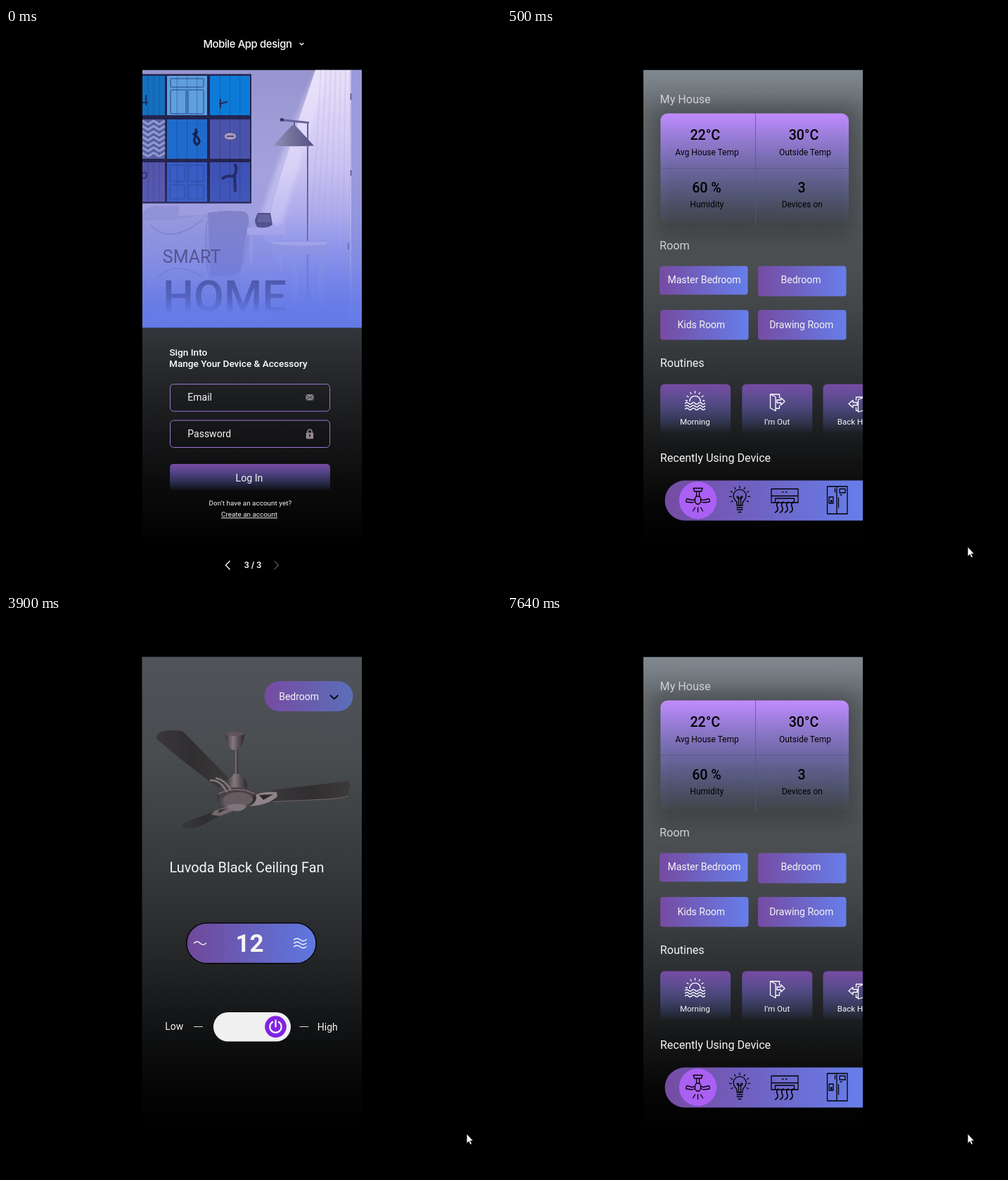
Recreate the animation shown at these times as an HTML page. Size 704 px wide and 795 px high, loop 8000 ms.

```html
<!DOCTYPE html>
<html lang="en">
<head>
<meta charset="utf-8">
<title>Smart home app</title>
<style>
html, body { margin: 0; width: 100%; height: 100%; overflow: hidden; background: #000; }
svg { display: block; width: 704px; height: 795px; }
text { font-family: Roboto, sans-serif; white-space: pre; }
.inter { font-family: Inter, sans-serif; }
</style>
</head>
<body>
<svg id="stage" viewBox="0 0 704 795" xmlns="http://www.w3.org/2000/svg"></svg>
<script>
const LOOP = 8000;
const CUES = [[0, 'login'], [500, 'home'], [3900, 'fan'], [7640, 'home']];

// --- drawing helpers ---
const box = (x, y, w, h, fill, r = 0, extra = '') =>
  `<rect x="${x}" y="${y}" width="${w}" height="${h}" rx="${r}" fill="${fill}" ${extra}/>`;
const shape = (d, fill, extra = '') => `<path d="${d}" fill="${fill}" ${extra}/>`;
const line = (d, color, width = 1, extra = '') =>
  `<path d="${d}" fill="none" stroke="${color}" stroke-width="${width}" ${extra}/>`;
const text = (x, y, str, size, fill = '#f4f4f4', extra = '') =>
  `<text x="${x}" y="${y}" font-size="${size}" fill="${fill}" ${extra}>${str}</text>`;
const label = (x, y, str, size, fill, extra = '') =>
  text(x, y, str, size, fill, `text-anchor="middle" ${extra}`);
const round = 'stroke-linecap="round" stroke-linejoin="round"';
const wave = (x, y, w, h) =>
  `M${x} ${y}q${w / 4} ${-h} ${w / 2} 0t${w / 2} 0`;

// stops: [offset, color, opacity]
function gradient(id, dir, stops, units = '') {
  const end = dir === 'v' ? 'x2="0" y2="1"' : 'x2="1" y2="0"';
  const list = stops.map(([o, c, a = 1]) =>
    `<stop offset="${o}" stop-color="${c}" stop-opacity="${a}"/>`).join('');
  return `<linearGradient id="${id}" ${units || end}>${list}</linearGradient>`;
}

const defs = `<defs>
  ${gradient('button', 'h', [[0, '#764ba2'], [1, '#667eea']])}
  ${gradient('picker', 'h', [[0, '#764ba2'], [1, '#5b6fba']])}
  ${gradient('speed', 'h', [[0, '#704899'], [1, '#5e78e0']])}
  ${gradient('fade', 'v', [[0, '#764ba2'], [1, '#667eea', 0]])}
  ${gradient('card', 'v', [[0, '#c18cff'], [1, '#667eea', 0]])}
  ${gradient('loginBg', 'v', [[0, '#323539'], [.4, '#1b1c1e'], [.7, '#0c0c0d'], [1, '#000']])}
  ${gradient('homeBg', 'v', [[0, '#818990'], [.08, '#686e73'], [.35, '#505457'], [.5, '#434649'],
    [.64, '#2f3235'], [.8, '#151617'], [.92, '#050505'], [1, '#000']])}
  ${gradient('fanBg', 'v', [[0, '#50545a'], [.2, '#494d50'], [.42, '#383b3e'], [.62, '#252729'],
    [.8, '#0f1011'], [.93, '#030303'], [1, '#000']])}
  ${gradient('wall', 'v', [[0, '#9795cf'], [.3, '#a19fd9'], [.6, '#a9a5e2'], [1, '#7d88e3']])}
  ${gradient('curtain', 'v', [[0, '#e9e0f8'], [.25, '#d5cdf4'], [.55, '#b9b2ec'], [1, '#7f8be6']])}
  ${gradient('haze', 'v', [[0, '#6a7ce8', 0], [.3, '#6a7ce8', .15], [.6, '#687be8', .52],
    [.85, '#647ae7', .9], [1, '#6279e7']])}
  ${gradient('shade', 'h', [[0, '#9391bb'], [.4, '#77759d'], [1, '#525085']])}
  ${gradient('homeWord', 'v', [[0, '#4f58ab'], [.6, '#5766c4'], [1, '#637ae6']],
    'gradientUnits="userSpaceOnUse" x1="0" y1="357" x2="0" y2="405"')}
  ${gradient('metal', 'h', [[0, '#3b3538'], [.4, '#85797f'], [.65, '#5d5257'], [1, '#2f292c']])}
  ${gradient('blade', 'h', [[0, '#39373a'], [.5, '#302e30'], [1, '#3c393a']])}
  <filter id="soft" x="-40%" y="-50%" width="180%" height="200%"><feGaussianBlur stdDeviation="16"/></filter>
  <filter id="blur3"><feGaussianBlur stdDeviation="3"/></filter>
  <clipPath id="phone">${box(194, 59.5, 312, 680, '#fff')}</clipPath>
  <clipPath id="photo">${box(194, 59.5, 312, 367, '#fff')}</clipPath>
</defs>`;

// --- login ---
function doors() {
  const cols = [[194, 32], [229, 57], [290, 57]];
  const rows = [68, 130, 191];
  const colors = ['#1470bf', '#5f9fdc', '#0c7bd8', '#5a64a6', '#1f6bcd', '#4a53ab', '#5555ab', '#385cc4', '#3d52b4'];
  let out = box(190, 65.5, 159, 184, '#24244f');
  rows.forEach((y, r) => cols.forEach(([x, w], c) => {
    out += box(x, y, w, 56, colors[r * 3 + c]);
    for (let i = 1; i < 4; i++)
      out += line(`M${x + w * i / 4} ${y}v56`, '#18376f', 1, 'opacity=".4"');
  }));
  for (let i = 0; i < 7; i++)
    out += line(`M194 ${132 + i * 7.6}l8 5l8 -5l8 5l8 -5`, '#a5afe0', 3, 'opacity=".75"');
  for (const [x, y, w, h] of [[234, 72, 47, 12], [234, 88, 22, 34], [259, 88, 22, 34],
                              [233, 195, 21, 23], [260, 195, 21, 23], [233, 223, 21, 20], [260, 223, 21, 20]])
    out += box(x, y, w, h, 'none', 1, 'stroke="#264f9c" stroke-opacity=".75" stroke-width="1.5"');
  out += line('M303 108l12 -3M305 101v13M194 106h8M199 95v15', '#242a59', 2)
    + '<ellipse cx="319" cy="154" rx="9" ry="5.5" fill="#a69bc2" stroke="#383b78"/>'
    + line('M314 154h10', '#4f4b85', 2)
    + line('M270 143v10q-5 8 1 13q7 -3 2 -10l-6 -5l6 -4', '#15204e', 3)
    + line('M325 193q5 8 0 16l1 24M307 215q6 -6 17 -4', '#252a67', 4)
    + line('M194 206q7 -2 6 4q-1 5 -6 3', '#34346e', 2);
  return out;
}

function room() {
  let out = box(194, 59.5, 312, 367, 'url(#wall)')
    + shape('M440 59.5H490V426H340Q368 285 395 196Q418 125 440 59.5z', 'url(#curtain)')
    + shape('M442 59.5Q395 160 358 280L392 282Q424 175 458 59.5z', '#eee8ff', 'opacity=".4" filter="url(#blur3)"');
  for (let i = 0; i < 6; i++)
    out += line(`M${448 + i * 7} 60Q${440 + i * 8} 210 ${425 + i * 11} 400`, '#a39bdc', 2, 'opacity=".2"');
  out += box(489.5, 59.5, 17, 367, '#9a9adc') + box(489.5, 59.5, 1.5, 367, '#c9c2ee')
    + line('M490.5 93v9M490.5 202v8M487 306v9', '#555590', 1.5);
  out += doors();
  // sofa and cushions
  out += shape('M194 264Q201 251 220 253H238Q246 251 248 258Q255 252 275 253H300Q308 255 307 262H333Q346 262 347 282V296Q368 298 382 312V426H194z', '#9796d6')
    + shape('M245 267Q245 253 257 253H297Q307 253 307 265z', '#a5a2df')
    + shape('M287 263Q310 258 338 261Q346 263 345 274L333 347Q318 356 291 353z', '#8583c4')
    + shape('M333 348Q343 325 347 296Q370 299 382 312V400H333z', '#a09fdf')
    + shape('M196 274Q230 276 277 266Q292 270 286 286Q280 326 292 360Q240 363 201 370Q188 350 196 274z', '#a09edb')
    + line('M286 274Q279 324 291 358M205 280q28 30 75 -8M214 357q24 -28 65 -4', '#7371b8', 1.5, 'opacity=".6"');
  // side tables
  out += shape('M343 284L397 282V294H343z', '#bbb3eb')
    + line('M349 294v42M391 294v52', '#aca7e3', 5)
    + shape('M358 263H376L379 280Q370 286 357 283Q354 278 354 273z', '#4b4876')
    + shape('M359 265H375L377 276H357z', '#625e91')
    + shape('M378 305Q381 302 390 302H452Q456 302 456 306V319Q455 322 449 322H381Q377 322 377 318z', '#a7a3e0')
    + shape('M378 304H456V308Q418 312 378 307z', '#bfb8ec')
    + line('M411 322v76M448 322v76', '#a6a4e3', 6);
  // lamp
  out += line('M390 130.5L429.5 134.5V303', '#66639a', 3)
    + line('M430.5 136V303', '#c8c0ea', 1)
    + line('M390 130.5h5', '#35335e', 4)
    + line('M410 132v8', '#605e91', 2)
    + shape('M407 138H411L438 167.5Q409 169 380 167.5z', 'url(#shade)');
  return out + line('M429 322V385', '#6f7dcf', 2.5)
    + box(194, 200, 312, 227, 'url(#haze)');
}

function login() {
  const field = (y, name) => box(233.5, y + .5, 227, 38.5, '#000', 5, 'fill-opacity=".12" stroke="#9b78d6"')
    + text(258.3, y + 24.2, name, 14);
  return label(343.5, 28.2, 'Mobile App design', 14.8, '#fff', 'class="inter" font-weight="500" letter-spacing="-.35"')
    + line('M417.8 21.2l2.8 2.8l2.8 -2.8', '#fff', 1.3)
    + `<g clip-path="url(#photo)">${room()}</g>`
    + text(222.8, 334, 'SMART', 25, '#565493')
    + text(223, 403, 'HOME', 62, 'url(#homeWord)', 'font-weight="500"')
    + box(194, 426.5, 312, 312, 'url(#loginBg)')
    + text(232.4, 466, 'Sign Into', 13.6, '#fff', 'font-weight="500"')
    + text(232, 482, 'Mange Your Device &amp; Accessory', 13.6, '#fff', 'font-weight="500"')
    + field(506, 'Email') + field(557.5, 'Password')
    + box(426.5, 521, 11, 8.5, '#8b8089', 1.5)
    + line('M427 522l5 4l5 -4M427 529l3.5 -3.5M437 529l-3.5 -3.5', '#252428', .9)
    + box(426.8, 575.5, 10.4, 8.8, '#918790', 1)
    + line('M429 576v-2q0 -3 3 -3t3 3v2', '#918790', 1.6)
    + '<circle cx="432" cy="579" r="1.2" fill="#1c1b1d"/>' + line('M432 579v3', '#1c1b1d', 1)
    + box(233, 620, 228, 38.5, 'url(#fade)', 5)
    + label(346, 644.5, 'Log In', 14.2)
    + label(347.3, 678.5, 'Don’t have an account yet?', 9.95)
    + label(346, 695.3, 'Create an account', 9.9, '#f4f4f4', 'text-decoration="underline"')
    + line('M318.5 757.8l-6 6.2l6 6.2', '#fff', 1.3)
    + label(351, 767.5, '3 / 3', 11.6, '#fff', 'class="inter" font-weight="600"')
    + line('M381.5 757.8l6 6.2l-6 6.2', '#5c5c5c', 1.2);
}

// --- home ---
// short strokes radiating from a center, spread evenly over an arc
function rays(cx, cy, inner, outer, from, to, count) {
  let d = '';
  for (let i = 0; i < count; i++) {
    const a = Math.PI * (from + (to - from) * i / (count - 1));
    const c = Math.cos(a), s = Math.sin(a);
    d += `M${cx + inner * c} ${cy + inner * s}L${cx + outer * c} ${cy + outer * s}`;
  }
  return d;
}

const morningIcon = () => {
  const sea = [533.8, 537.8, 541.8].map(y =>
    [253.5, 262.8, 272.1].map(x => wave(x, y, 9.3, 2.6)).join('')).join('');
  return line(`${rays(267.5, 530, 11, 13.3, 1, 2, 7)}M259.8 531a7.7 7.7 0 0 1 15.4 0${sea}`, '#fff', 1.3, round);
};
const outIcon = line('M374.5 521l7.5 3.5v20l-7.5 -4zM374.5 521h13v5M387.5 537v4h-5.5M384 529h5.5v-3.2l5.5 5.2l-5.5 5.2v-3.2h-5.5z', '#fff', 1.3, round);
const backIcon = line('M508 525l-8.5 3.5v17.5l8.5 -2.5M496.5 529v-4h11M496.5 540v4h3M498 532.5h-6v-3.2l-6 5.2l6 5.2v-3.2h6z', '#fff', 1.3, round);

function devices() {
  const fan = 'M265 654.5h13l-1.5 4.5h-10zM269.5 659v7h4v-7M267.5 669l1.5 -3h5l1.5 3v5l-2 3h-4l-2 -3z'
    + 'M267.5 670.5l-4 1l-7.5 -2q-2 1.5 -1 4.5l8.5 1l4 -1.5M275.5 670.5l4 1l7.5 -2q2 1.5 1 4.5l-8.5 1l-4 -1.5'
    + 'M271.5 682v6.5M267.5 682l-3 5M275.5 682l3 5';
  const bulb = 'M327 679v-3q0 -2 -2.5 -4.5a9 9 0 1 1 13 0q-2.5 2.5 -2.5 4.5v3zM327 682h8M327 685h8M329 688.5h4'
    + 'M329.5 679v-9l-2 -2q-1 -2 1 -2q1 0 1 3h3q0 -3 1 -3q2 0 1 2l-2 2v9';
  const cooler = 'M376 655.5h38v19.5h-38zM381.5 675v-6h27v6M376 665.5h38M391.5 660h1.5M396.5 660h1.5';
  const air = [386, 393, 400, 407].map(x => `M${x} 674q-4 3 -1.5 7.5t-3 7.5`).join('');
  const fridge = 'M455.5 652h28.5v39h-28.5zM469 652v39M458 667h6v9h-6zM473 655.5h8v5.5h-8zM474 664h2M466.5 655v5M471.5 668v14M460.5 672h1.5v2h-1.5z';
  return '<circle cx="271.5" cy="671.7" r="26.7" fill="#ab60f4"/>'
    + line(fan + bulb + rays(331, 666, 12, 14.5, .82, 2.18, 9) + cooler + fridge, '#000', 1.3, round)
    + line(air, '#000', 1.6, round);
}

function home() {
  const stat = (x, y, value, cx, note, dy) =>
    label(x, y, value, 19.6, '#000', 'font-weight="500"') + label(cx, y + dy, note, 12, '#000');
  const roomButton = (x, y, w, h, cx, name) =>
    box(x, y, w, h, 'url(#button)', 4) + label(cx, y < 400 ? 363 : 427.2, name, 14);
  const routine = (x, cx, name) =>
    box(x, 506.5, 100, 71, 'url(#fade)', 6) + label(cx, 563.6, name, 11.6);
  return `<g clip-path="url(#phone)">`
    + box(194, 59.5, 312, 678, 'url(#homeBg)')
    + box(208, 114, 290, 188, '#383b3c', 14, 'opacity=".68" filter="url(#soft)"')
    + text(217.6, 107, 'My House', 16.1, '#d0d0d2')
    + box(218.3, 121.5, 267.7, 158.5, 'url(#card)', 10)
    + line('M353.5 121.5V280M218.3 199.5H486', '#5d5484', 1, 'opacity=".75"')
    + stat(281.7, 159, '22°C', 284.5, 'Avg House Temp', 22.3)
    + stat(422, 159, '30°C', 424, 'Outside Temp', 22.3)
    + stat(284, 234.3, '60 %', 284.3, 'Humidity', 20.3)
    + stat(419, 234.3, '3', 419.8, 'Devices on', 20.3)
    + text(217, 315, 'Room', 16.2, '#d0d0d2')
    + roomButton(217, 338.5, 125.5, 40.8, 280.5, 'Master Bedroom')
    + roomButton(357, 338.5, 125.5, 43, 418, 'Bedroom')
    + roomButton(218, 401, 125.5, 42.5, 276.3, 'Kids Room')
    + roomButton(357, 401, 125.5, 42.5, 418.7, 'Drawing Room')
    + text(217.8, 482, 'Routines', 16.1)
    + routine(218, 267.3, 'Morning') + routine(334.3, 384, 'I’m Out') + routine(449.5, 499.5, 'Back Home')
    + morningIcon() + outIcon + backIcon
    + text(217.8, 616.7, 'Recently Using Device', 16.1)
    + shape('M506 643.5H253a28.5 28.5 0 0 0 0 57H506z', 'url(#button)')
    + devices() + '</g>';
}

// --- fan ---
function ceilingFan() {
  const blade = d => shape(d, 'url(#blade)', 'stroke="#474142" stroke-width=".6"');
  return blade('M308 275L258 293Q246 299 251 303Q268 306 281 298L318 279z')
    + blade('M214 176Q214 166 228 164.5Q246 163 252 166L317 232L303 246Q260 216 214 176z')
    + blade('M377 249L483 236.5Q490 236 489.5 242L486 257Q482 261 455 262.5L376 266z')
    + line('M380 265.5L455 262Q482 260.5 486 257', '#817477', .8)
    + box(325, 190, 4.5, 38, 'url(#metal)')
    + shape('M312 169Q325 163 339 169Q339 182 332 190Q325 194 319 190Q312 181 312 169z', 'url(#metal)')
    + '<ellipse cx="325.5" cy="169" rx="13" ry="3" fill="#5f5459"/>'
    + shape('M324 226H332Q335 229 340 232Q344 240 343 247H313Q313 237 318 232Q322 230 324 226z', 'url(#metal)')
    + shape('M353 257Q363 251 385 252L386 258Q372 271 345 272z', '#8f8488')
    + shape('M360 256L380 255L366 263z', '#29272a')
    + shape('M322 270L297 278L292 284L304 286L322 279z', '#74686c')
    + shape('M303 277L315 275L302 282z', '#343033')
    + '<ellipse cx="328" cy="260" rx="28" ry="15.5" fill="url(#metal)"/>'
    + '<ellipse cx="328" cy="254" rx="26" ry="9" fill="#4a4145"/>'
    + line('M302 254Q328 242 354 254', '#8d8085', 1)
    + '<ellipse cx="330" cy="262" rx="21" ry="10" fill="#665b60"/>'
    + shape('M315 271Q328 266 342 271Q339 279 328 279Q318 279 315 271z', '#80747a')
    + line('M291 235Q304 235 311 247L314 251M299 232Q312 235 319 248', '#85797e', 2.5, round);
}

function fanPage() {
  const waves = [461.8, 466.8, 471.8].map(y => wave(409.5, y, 17.5, 3.8)).join('');
  return box(193.5, 59.5, 312.5, 678, 'url(#fanBg)')
    + box(367.5, 94, 126, 43, 'url(#picker)', 21.5)
    + text(388.2, 120.7, 'Bedroom', 14)
    + line('M461.5 114.5l5.2 4.8l5.2 -4.8', '#000', 1.8, round)
    + ceilingFan()
    + label(342.5, 366, 'Luvoda Black Ceiling Fan', 19.9)
    + box(257, 438.2, 184, 57.3, 'url(#speed)', 28.6, 'stroke="#000" stroke-width="1.3"')
    + line(wave(267.5, 466.7, 17, 4.4) + waves, '#f4f4f4', 1.4, round)
    + label(346.5, 479, '12', 35, '#f4f4f4', 'font-weight="700"')
    + text(226.2, 590.3, 'Low', 14) + text(442.8, 590.8, 'High', 14)
    + line('M267 585.5h13M417.5 585.5h13', '#d8d8d8')
    + box(295, 565, 110, 41.5, '#f0f0f1', 20.7)
    + '<circle cx="383.5" cy="585.6" r="15.3" fill="#8022e4"/>'
    + line('M379.2 578.8a8.2 8.2 0 1 0 8.6 0M383.5 576.5v9', '#f4f4f4', 2.3, 'stroke-linecap="round"');
}

const cursor = shape('M655.3 738v13.3l3 -2.8l2 4.6l2.1 -.9l-2 -4.5h3.9z', '#fff', 'stroke="#000" stroke-width=".5"');

const stage = document.getElementById('stage');
const scenes = { login: login(), home: home() + cursor, fan: fanPage() + cursor };
stage.innerHTML = defs + Object.entries(scenes)
  .map(([id, art]) => `<g id="${id}" visibility="hidden">${art}</g>`).join('');

function render(time) {
  const t = time % LOOP;
  const current = CUES.filter(([start]) => t >= start).pop()[1];
  for (const id in scenes)
    document.getElementById(id).setAttribute('visibility', id === current ? 'visible' : 'hidden');
}

const start = performance.now();
function tick() {
  render(Math.max(0, performance.now() - start));
  requestAnimationFrame(tick);
}
render(0);
requestAnimationFrame(tick);
</script>
</body>
</html>
```
